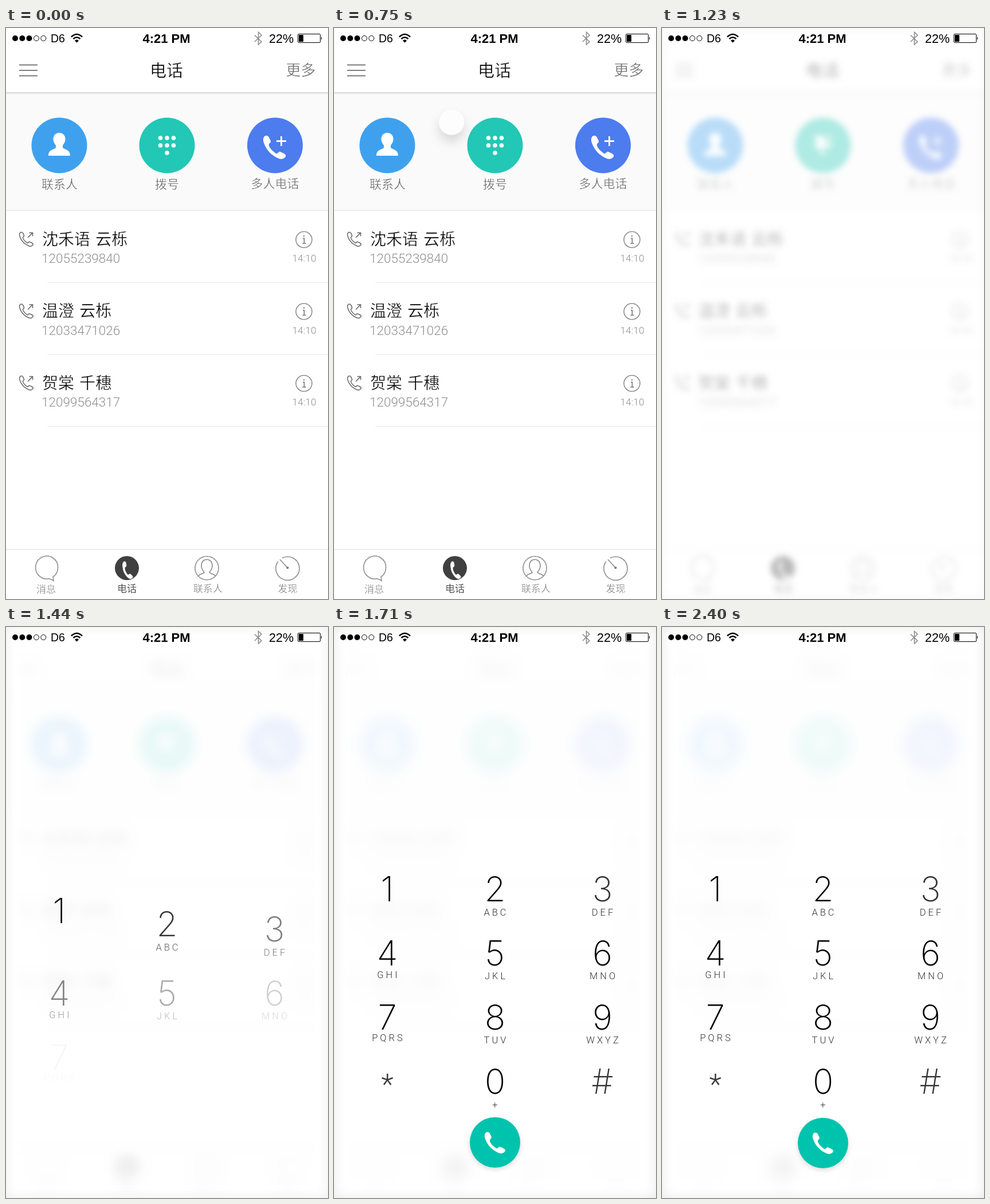
These frames come from a looping animation (562x997 px, 2430 ms). An HTML page:

```html
<!DOCTYPE html>
<html lang="zh-CN">
<head>
<meta charset="utf-8">
<title>拨号</title>
<style>
  html, body { margin: 0; width: 100%; height: 100%; overflow: hidden; background: #fff; }
  svg, #edge { position: absolute; left: 0; top: 0; width: 562px; height: 997px; }
  #edge { box-shadow: inset 0 0 22px rgba(0, 0, 0, .085); }
  text { font-family: Roboto, "Noto Sans CJK SC", "Noto Sans CJK", sans-serif; font-weight: 300; }
  /* The pale outline thins the strokes of the characters. */
  .cjk { font-family: "Noto Sans CJK SC", "Noto Sans CJK", sans-serif; }
  text.cjk { stroke: #fff; stroke-width: .018em; }
  .bar { font-family: "Liberation Sans", sans-serif; font-weight: 400; }
  .digit { font-family: Inter, Roboto, sans-serif; font-weight: 200; }
  .mid { text-anchor: middle; }
  .line { fill: none; stroke: #8e8e8e; stroke-width: 1.6; }
  #ball { filter: drop-shadow(0 12px 9px rgba(0, 0, 0, .13)); }
  #call { filter: drop-shadow(0 3px 4px rgba(0, 0, 0, .15)); }
</style>
</head>
<body>
<svg viewBox="0 0 562 997">
  <defs>
    <path id="handset" d="M3 2C1 4 0 8 2 13C6 25 15 34 27 39C32 41 36 39 38 36C39 34 38 32 36 31L30 28C28 27 26 28 25 30C24 31 22 31 20 29C16 26 13 23 11 19C10 17 10 15 11 14C13 13 14 11 13 9L10 3C9 1 5 0 3 2Z"/>
    <linearGradient id="drop" x2="0" y2="1">
      <stop stop-color="#d2d2d2"/><stop offset="1" stop-color="#fafafa"/>
    </linearGradient>
  </defs>

  <g id="home">
    <rect width="562" height="997" fill="#fff"/>
    <rect y="113" width="562" height="205" fill="#fafafa"/>
    <rect y="112" width="562" height="4" fill="url(#drop)"/>
    <path d="M0 318.5H562M0 910.5H562" stroke="#e0e0e0"/>
    <path d="M23 64.5H55M23 74H55M23 83.5H55" stroke="#555" stroke-width="1.6"/>
    <text class="cjk mid" x="280" y="85" font-size="29">电话</text>
    <text class="cjk mid" x="514.5" y="83" font-size="26" fill="#666">更多</text>

    <circle cx="93" cy="205" r="48.5" fill="#3fa1ee"/>
    <circle cx="281" cy="205" r="48.5" fill="#22c8b5"/>
    <circle cx="469.5" cy="205" r="48.5" fill="#4c7cee"/>
    <g fill="#fff">
      <path d="M93 183C100 183 103.500 188 103.500 194C103.500 199 101 202 99 205V209C103 213 112 212 112 223H74C74 212 83 213 87 209V205C85 202 82.500 199 82.500 194C82.500 188 86 183 93 183Z"/>
      <use href="#handset" transform="translate(448 187) scale(1.05)"/>
      <path d="M480.500 189V206M472 197.500H489" stroke="#fff" stroke-width="3"/>
      <g id="dots"></g>
    </g>
    <path id="goo" stroke="#fff" stroke-width="8" stroke-linecap="round"/>
    <g font-size="21" fill="#666">
      <text class="cjk mid" x="93.500" y="280">联系人</text>
      <text class="cjk mid" x="281" y="280">拨号</text>
      <text class="cjk mid" x="469.500" y="279">多人电话</text>
    </g>

    <g id="rows"></g>

    <path class="line" d="M83 965L82 958.500A19.500 20 0 1 0 75 961.500Q80 963 83 965Z"/>
    <circle cx="211" cy="943" r="21" fill="#404040"/>
    <use href="#handset" fill="#fff" transform="translate(204 930) rotate(12) scale(.6 .72)"/>
    <circle class="line" cx="350.500" cy="943" r="20.500"/>
    <path class="line" d="M336 957C338 952 345 954 346 950C342 946 341 943 341 939C341 932 345 928 350.500 928S360 932 360 939C360 943 359 946 355 950C356 954 363 952 365 957"/>
    <path class="line" d="M482 925.500A20.500 20.500 0 1 1 475 931.500M478 928L491 942"/>
    <circle cx="491.500" cy="942.500" r="2" fill="#777"/>
    <g font-size="17" fill="#858585">
      <text class="cjk mid" x="70" y="986">消息</text>
      <text class="cjk mid" x="211" y="985" fill="#222">电话</text>
      <text class="cjk mid" x="352.500" y="985">联系人</text>
      <text class="cjk mid" x="491.500" y="985">发现</text>
    </g>
    <circle id="ball" r="22.500" fill="#fdfdfd" stroke="#eee" stroke-width=".6"/>
  </g>

  <g id="status">
    <circle cx="16" cy="18" r="5"/><circle cx="28.300" cy="18" r="5"/><circle cx="40.500" cy="18" r="5"/>
    <g fill="none" stroke="#000">
      <circle cx="53" cy="18" r="4.500"/><circle cx="65.300" cy="18" r="4.500"/>
      <path d="M114 15.500Q123.500 6.500 133 15.500M117.500 19Q123.500 13.500 129.500 19" stroke-width="2.600"/>
      <path d="M434 12.500L446 24L440.500 29V7.500L446 12.500L434 24" stroke="#888" stroke-width="1.500"/>
      <rect x="509.500" y="10.500" width="39" height="15" rx="1.500"/>
    </g>
    <path d="M120 22Q123.500 18.500 127 22L123.500 25.500ZM511 12H519V24H511ZM550 15Q552.500 18 550 21Z"/>
    <text class="bar" x="78" y="25" font-size="19.500">D6</text>
    <text class="bar mid" x="280" y="25.500" font-size="22" style="font-weight:700">4:21 PM</text>
    <text class="bar" x="459" y="25.500" font-size="21.500">22%</text>
  </g>

  <g id="keys"></g>
</svg>
<div id="edge"></div>

<script>
const $ = id => document.getElementById(id);
const clamp = x => Math.max(0, Math.min(1, x));
const easeOut = p => 1 - (1 - p) ** 2;
const LOOP = 2430, STEP = 30;

// Call log
$('rows').innerHTML = [
  ['沈禾语 云栎', '12055239840'],
  ['温澄 云栎', '12033471026'],
  ['贺棠 千穗', '12099564317']
].map(([name, number], i) => `<g transform="translate(0 ${i * 125.5})">
  <use class="line" href="#handset" transform="translate(23 356) scale(.63)" style="stroke:#666;stroke-width:2.400"/>
  <path class="line" d="M38 366L46.500 357.500M40.500 357.500H46.500V363.500" style="stroke:#666"/>
  <text class="cjk" x="63" y="378.500" font-size="28" word-spacing="3">${name}</text>
  <text x="62" y="410" font-size="22.500" fill="#8e8e8e">${number}</text>
  <circle class="line" cx="520" cy="369.500" r="14"/>
  <path class="line" d="M518 367.500H520.500V376M517.500 376H523.500M520 362V364.500" style="stroke-width:2"/>
  <text class="mid" x="520.500" y="408" font-size="17.300" fill="#8e8e8e">14:10</text>
  <path d="M72 444.500H562" stroke="#e4e4e4"/></g>`).join('');

const dots = [[269.5, 192], [281, 192], [292.5, 192], [269.5, 205], [281, 205], [292.5, 205], [281, 218]];
$('dots').innerHTML = dots.map(([x, y]) => `<circle cx="${x}" cy="${y}" r="3.800"/>`).join('');

// Keypad, with the call button as the last key
const columns = [93, 281, 468.5];
const letters = ['', 'ABC', 'DEF', 'GHI', 'JKL', 'MNO', 'PQRS', 'TUV', 'WXYZ', '', '+', ''];
const labelY = [504, 504, 504, 613, 615, 615, 723, 727, 727, 0, 840, 0];
$('keys').innerHTML = [...'123456789*0#'].map((key, i) => {
  const x = columns[i % 3], y = 479 + 112 * Math.floor(i / 3);
  const ink = '3*#'.includes(key) ? '#333' : '#000';
  const symbol = key === '*'
    ? `<text class="mid" x="${x}" y="816" font-size="50" fill="${ink}">*</text>`
    : `<text class="mid digit" x="${x}" y="${y}" font-size="60" fill="${ink}">${key}</text>`;
  const gap = letters[i].length > 1 ? 4 : 0;
  return `<g>${symbol}
    <text class="mid" x="${x + gap / 2}" y="${labelY[i]}" font-size="16.500" letter-spacing="${gap}" fill="#333">${letters[i]}</text></g>`;
}).join('') + `<g><circle id="call" cx="281" cy="901" r="44" fill="#00c3ae"/>
  <use href="#handset" fill="#fff" transform="translate(262 882) scale(.96)"/></g>`;
const keys = [...$('keys').children];

// Remaining share of a damped spring's travel after a given time
function spring(ms) {
  if (ms <= 0) return 1;
  const damping = .04, speed = .035;
  return Math.exp(-damping * ms) * (Math.cos(speed * ms) + damping / speed * Math.sin(speed * ms));
}

function drawBall(t) {
  const u = easeOut(clamp((t - 480) / 510)), v = 1 - u;
  const along = (from, bend, to) => v * v * from + 2 * u * v * bend + u * u * to;
  const spread = clamp((t - 840) / 180);
  const ball = $('ball');
  ball.setAttribute('cx', along(-25, 175, 241));
  ball.setAttribute('cy', along(70, 85, 217));
  ball.setAttribute('r', 22.5 + 72.5 * spread);
  ball.style.opacity = t < 480 ? 0 : 1 - spread;
}

function drawGoo(t) {
  const q = clamp((t - 900) / 90);
  const joined = dots.filter((_, i) => i !== 2 && i !== 6);
  $('goo').setAttribute('d', q ? joined.map(([x, y]) =>
    `M${x + (279.5 - x) * .2 * q} ${y}L${x + (279.5 - x) * q} ${y + (202 - y) * q}`).join('') + `M279 202L${279 - 3 * q} ${202 + 7 * q}` : '');
}

function draw(t) {
  drawBall(t);
  drawGoo(t);
  const p = clamp((t - 990) / 540);
  $('home').style.filter = p ? `blur(${11.5 * p}px)` : 'none';
  $('home').style.opacity = 1 - .925 * easeOut(p);
  $('edge').style.opacity = p;
  keys.forEach((key, i) => {
    key.style.opacity = clamp((t - 1347 - 15 * i) / 100);
    key.setAttribute('transform', `translate(0 ${70 * spring(t - 1414 - 15 * i)})`);
  });
}

function tick() {
  draw(Math.floor(performance.now() % LOOP / STEP) * STEP);
  requestAnimationFrame(tick);
}
tick();
</script>
</body>
</html>
```
